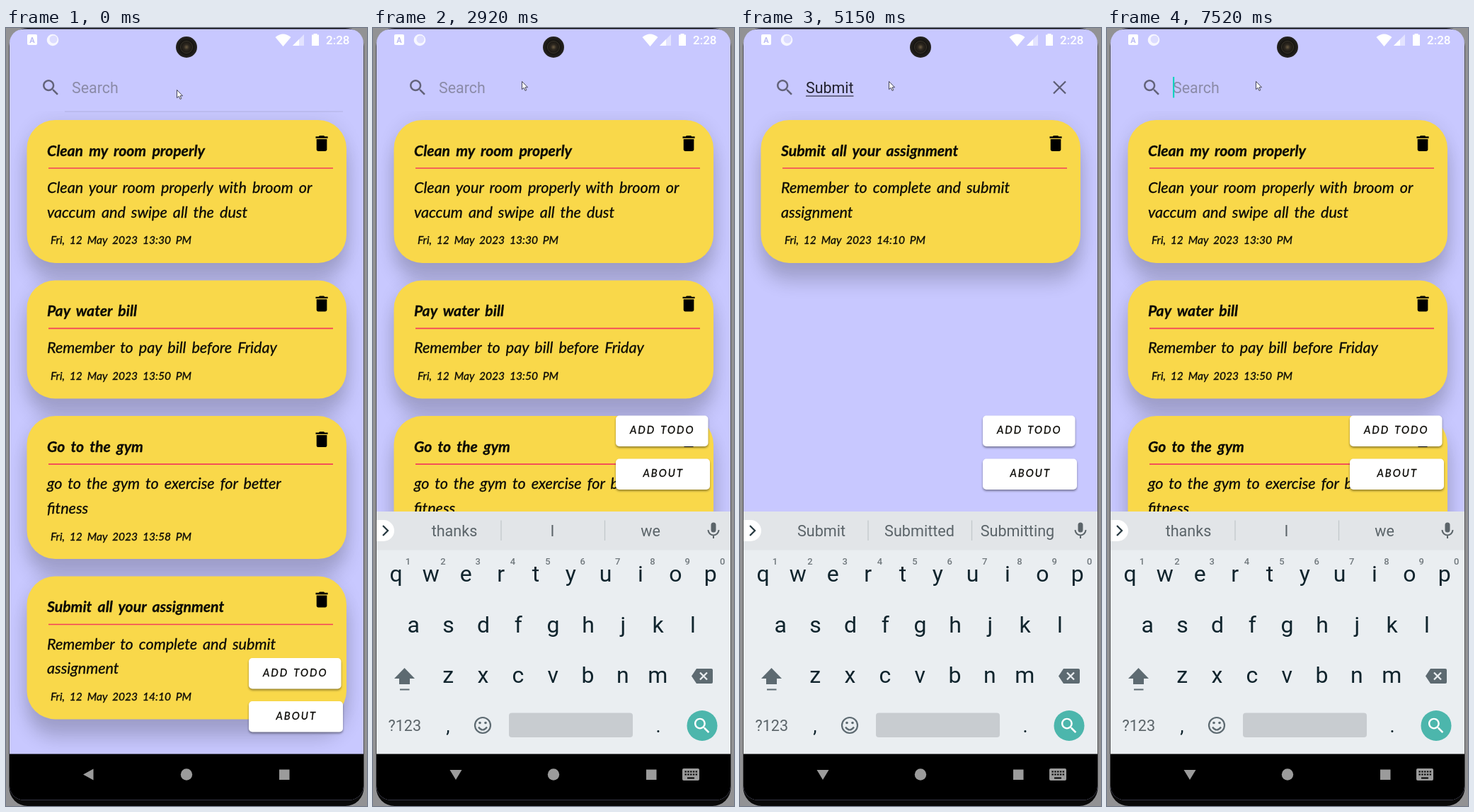
An HTML page that plays this animation: 510x1099 px, repeating every 8 s.

```html
<!DOCTYPE html>
<html lang="en">
<head>
<meta charset="utf-8">
<title>Todo search</title>
<style>
html, body { margin: 0; width: 100%; height: 100%; overflow: hidden; background: #000; }
svg { display: block; width: 100%; height: 100%; }
text { font-family: Roboto, sans-serif; white-space: pre; }
.hand { font-family: Lato, sans-serif; font-style: italic; fill: #0b0a06; stroke: #0b0a06; stroke-width: .3; }
.title { font-size: 21.2px; font-weight: 700; word-spacing: 3.6px; }
.body { font-size: 21.6px; word-spacing: 3px; }
.date { font-size: 15.6px; word-spacing: 3.2px; }
.btn { font-size: 14.8px; letter-spacing: 2px; word-spacing: 2px; }
.field { font-size: 21.4px; }
.key { font-size: 32px; fill: #10242d; }
.word { font-size: 21.6px; fill: #5b6469; }
.num { font-size: 13px; font-weight: 500; fill: #70787d; }
.mid { text-anchor: middle; }
</style>
</head>
<body>
<svg viewBox="0 0 510 1099" xmlns="http://www.w3.org/2000/svg">
  <defs>
    <radialGradient id="lens">
      <stop offset="0" stop-color="#6b5c42"/><stop offset=".25" stop-color="#2e2820"/>
      <stop offset=".6" stop-color="#15130f"/><stop offset="1" stop-color="#262422"/>
    </radialGradient>
    <filter id="soft" x="-20%" y="-40%" width="140%" height="180%"><feGaussianBlur stdDeviation="13"/></filter>
    <filter id="lift" x="-10%" y="-20%" width="120%" height="150%"><feGaussianBlur stdDeviation="1.6"/></filter>
    <clipPath id="screen"><rect x="5" y="1.5" width="500" height="1089" rx="20"/></clipPath>
    <clipPath id="list"><rect id="listBox" x="5" y="117" width="500" height="909"/></clipPath>
    <clipPath id="dock"><rect x="5" y="683" width="500" height="343"/></clipPath>
    <path id="glass" d="M15.5 14h-.79l-.28-.27C15.41 12.59 16 11.11 16 9.5 16 5.91 13.09 3 9.5 3S3 5.91 3 9.5 5.91 16 9.5 16c1.61 0 3.09-.59 4.23-1.57l.27.28v.79l5 4.99L20.49 19l-4.99-5zm-6 0C7.01 14 5 11.99 5 9.5S7.01 5 9.5 5 14 7.01 14 9.5 11.99 14 9.5 14z"/>
    <path id="bin" d="M6 19c0 1.1.9 2 2 2h8c1.1 0 2-.9 2-2V7H6v12zM19 4h-3.5l-1-1h-5l-1 1H5v2h14V4z"/>
  </defs>

  <rect width="510" height="1099" fill="#929294"/>
  <rect x="4.500" width="501" height="1099" rx="26" fill="#0a0a0a"/>

  <g clip-path="url(#screen)">
    <rect x="5" width="500" height="1099" fill="#c8c8ff"/>

    <g id="status" fill="#fff">
      <rect x="30" y="9" width="14" height="15" rx="2"/>
      <text x="37" y="21" class="mid" font-size="11" font-weight="700" fill="#b9b9f4">A</text>
      <circle cx="66" cy="17" r="8.3" opacity=".85"/>
      <circle cx="67" cy="16" r="5.5" fill="#dcdcff"/>
      <path d="M380.5 13Q391.500 4 402.500 13L391.500 26Z"/>
      <path d="M421 9V25H405Z" opacity=".5"/><path d="M414 16V25H405Z"/>
      <path d="M434.500 9.500V8H439.500V9.500H442V25H432V9.500Z"/>
      <text x="452" y="23" font-size="17" font-weight="500">2:28</text>
    </g>
    <circle cx="255" cy="27" r="15" fill="url(#lens)"/>
    <circle cx="255" cy="27" r="8.500" fill="none" stroke="#3a352c"/>

    <use href="#glass" transform="translate(48.3 69.2) scale(1.25)" fill="#63637a"/>
    <path id="rule" d="M83 118H476" stroke="#b4b4e4" stroke-width="1.2"/>
    <text id="query" class="field" x="93" y="92"></text>
    <path id="under" stroke="#33334a" stroke-width="1.3"/>
    <rect id="caret" y="69" width="2.2" height="29.500" fill="#0fd3c0"/>
    <path id="clear" d="M443 75.500L460 92.500M460 75.500L443 92.500" stroke="#5c5c74" stroke-width="2.2"/>

    <g id="cards" clip-path="url(#list)"></g>
    <g id="buttons"></g>
    <g clip-path="url(#dock)">
      <rect id="blank" x="5" y="683" width="500" height="343" fill="#fff"/>
      <g id="keys"></g>
    </g>

    <rect x="5" y="1025.500" width="500" height="74" fill="#000"/>
    <g fill="#9b9b9b">
      <path id="back"/>
      <circle cx="255" cy="1054.500" r="8.200"/>
      <rect x="386" y="1047.500" width="14.500" height="14.500"/>
      <g id="imeIcon">
        <rect x="437" y="1046" width="24" height="17" rx="2"/>
        <path d="M440.500 1050.500H458M440.500 1054.500H458" stroke="#000" stroke-width="2.2" stroke-dasharray="2.3 1.5"/>
        <path d="M444 1059.500H454" stroke="#000" stroke-width="2"/>
      </g>
    </g>
  </g>
  <path id="pointer" d="M0 0V11.200L2.700 8.900L4.500 13L6.300 12.200L4.500 8.300H8Z" fill="#fff" stroke="#333347" stroke-width=".9"/>
</svg>

<script>
const LOOP = 8000;
const $ = id => document.getElementById(id);
const show = (id, on) => $(id).setAttribute('visibility', on ? 'visible' : 'hidden');
const label = (cls, x, y, s) => `<text class="${cls}" x="${x}" y="${y}">${s}</text>`;
const last = (steps, t) => steps.filter(s => s[0] <= t).pop();

const todos = [
  ['Clean my room properly', ['Clean your room properly with broom or', 'vaccum and swipe all the dust'], '13:30'],
  ['Pay water bill', ['Remember to pay bill before Friday'], '13:50'],
  ['Go to the gym', ['go to the gym to exercise for better', 'fitness'], '13:58'],
  ['Submit all your assignment', ['Remember to complete and submit', 'assignment'], '14:10']
];

// Each step: start time, then its value
const pointerSteps = [
  [0, 241, 87], [140, 268, 101], [260, 288, 140], [380, 272, 135], [500, 246, 122],
  [650, 201, 118], [800, 198, 131], [950, 217, 115], [1090, 210, 75]
];
const typed = [
  [0, ''], [3480, 'S'], [3910, 'Su'], [4030, 'Sub'], [4280, 'Subm'], [4530, 'Submi'], [4650, 'Submit'],
  [5680, 'Submi'], [5830, 'Subm'], [5950, 'Sub'], [6070, 'Su'], [6340, 'S'], [6610, '']
];
const hints = [
  [0, 'thanks I we'], [3480, 'S So She'], [3910, 'Su Sure Sunday'], [4030, 'Sub Submit Subject'],
  [4280, 'Subm Submit Subject'], [4530, 'Submit Submitted Submitting'], [5830, 'Subm Submit Subject'],
  [5950, 'Sub Submit Subject'], [6220, 'Su Sure Sunday'], [6460, 'S So She'], [6610, 'thanks I we']
];
const caretSteps = [[0, 0], [2180, 1], [2920, 0], [3480, 1], [5150, 0], [5680, 1], [6990, 0], [7520, 1]];
const RESIZE = 2300, KEYS_IN = 2550, KEYS_SET = 2670;

function cardList(filter) {
  let y = 130, shadows = '', faces = '';
  for (const [title, lines, hour] of todos) {
    if (!(title + ' ' + lines.join(' ')).toLowerCase().includes(filter.toLowerCase())) continue;
    const h = 132.5 + lines.length * 34.7;
    const box = (dy, attrs) => `<rect x="29.5" y="${y + dy}" width="451.5" height="${h}" rx="40" ${attrs}/>`;
    shadows += box(27, 'fill="#000" opacity=".17" filter="url(#soft)"') +
               box(2, 'fill="#000" opacity=".09" filter="url(#soft)"');
    faces += box(0, 'fill="#f9d84a"') +
      label('hand title', 58, y + 50.5, title) +
      `<path d="M60 ${y + 68}H462" stroke="#f33f5a" stroke-width="1.6"/>` +
      `<use href="#bin" transform="translate(431.4 ${y + 18.4}) scale(1.22)"/>` +
      lines.map((s, i) => label('hand body', 58, y + 103 + i * 34.7, s)).join('') +
      label('hand date', 63, y + h - 26.5, `Fri, 12 May 2023 ${hour} PM`);
    y += h + 24.5;
  }
  return shadows + faces;
}

function button(y, w, x, s) {
  const box = `x="343" width="${w}" height="43.5" rx="5"`;
  return `<rect ${box} y="${y + 2}" fill="#000" opacity=".4" filter="url(#lift)"/>` +
    `<rect ${box} y="${y}" fill="#fff"/>` + label('hand btn', x, y + 25.5, s);
}

function keyboard() {
  const row = (keys, x, y, cls = 'key mid') =>
    [...keys].map((k, i) => label(cls, x + i * 49.35, y, k)).join('');
  return `<rect x="5" y="683" width="500" height="343" fill="#eaeef1"/>
    <rect x="5" y="683" width="500" height="54.5" fill="#e2e5e8"/>
    <path d="M181 695.5V724M327.500 695.5V724" stroke="#c3c8cc" stroke-width="1.3"/>
    <path d="M5 695H15A15 15 0 0 1 15 725H5Z" fill="#fff"/>
    <path d="M14 703L21 710L14 717" fill="none" stroke="#273940" stroke-width="2.3"/>
    <rect x="477.500" y="698.500" width="7" height="14" rx="3.500" fill="#5b6469"/>
    <path d="M473.500 709A7.500 7.500 0 0 0 488.500 709M481 716.500V721" fill="none" stroke="#5b6469" stroke-width="2"/>
    <g id="hints"></g>` +
    row('qwertyuiop', 32.5, 782) + row('1234567890', 49.5, 758, 'num mid') +
    row('asdfghjkl', 57.2, 853.5) + row('zxcvbnm', 106.2, 925) +
    `<path d="M44.500 904L59 919H52V927H37V919H30Z" fill="#5d6a71"/>
    <path d="M38 934.500H51.500" stroke="#5d6a71" stroke-width="2"/>
    <path d="M450 915.500L457 905H478Q480 905 480 907V924Q480 926 478 926H457Z" fill="#5d6a71"/>
    <path d="M462 910.500L472 920.500M472 910.500L462 920.500" stroke="#eaeef1" stroke-width="2.3"/>` +
    label('word', 21.5, 993, '?123') +
    `<text class="mid" x="106" y="995" font-size="27" fill="#10242d">,</text>
    <text class="mid" x="403" y="995" font-size="27" fill="#10242d">.</text>
    <g fill="none" stroke="#5d6a71" stroke-width="2.2">
      <circle cx="155" cy="985" r="11"/><path d="M149 987.500Q155 995.500 161 987.500"/>
    </g>
    <circle cx="151" cy="981.500" r="1.800" fill="#5d6a71"/><circle cx="159" cy="981.500" r="1.800" fill="#5d6a71"/>
    <rect x="192" y="967.500" width="175" height="34.500" rx="4" fill="#c8ccd0"/>
    <circle cx="465" cy="985.500" r="21.500" fill="#4cb6ac"/>
    <use href="#glass" transform="translate(450.300 971) scale(1.22)" fill="#fff"/>`;
}

$('keys').innerHTML = keyboard();
$('buttons').innerHTML = button(890, 130.5, 363, 'ADD TODO') + button(951, 133, 381.5, 'ABOUT');

let shownText = null, shownHints = null;

function setText(s) {
  if (s === shownText) return;
  shownText = s;
  const q = $('query');
  q.textContent = s || 'Search';
  q.setAttribute('fill', s ? '#22222f' : '#8b8ba8');
  const end = 93 + (s ? q.getComputedTextLength() : 0);
  $('under').setAttribute('d', s ? `M93 96.200H${end}` : '');
  $('caret').setAttribute('x', end + (s ? .3 : 0));
  show('clear', s);
  $('cards').innerHTML = cardList(s);
}

function setHints(s) {
  if (s === shownHints) return;
  shownHints = s;
  $('hints').innerHTML = s.split(' ').map((w, i) => label('word mid', 115 + i * 138.5, 718, w)).join('');
}

function draw(t) {
  const [, px, py] = last(pointerSteps, t);
  const open = t >= RESIZE;
  $('pointer').setAttribute('transform', `translate(${px + .5} ${py + .5})`);
  setText(last(typed, t)[1]);
  setHints(last(hints, t)[1]);
  show('caret', last(caretSteps, t)[1]);
  show('rule', t < 2180);
  $('listBox').setAttribute('height', open ? 566 : 909);
  $('buttons').setAttribute('transform', `translate(0 ${open ? -342.500 : 0})`);
  show('blank', open);
  show('keys', t >= KEYS_IN);
  $('keys').setAttribute('transform', `translate(0 ${t < KEYS_SET ? 60 : 0})`);
  show('imeIcon', open);
  $('back').setAttribute('d', open ? 'M108.500 1048H125.500L117 1062Z' : 'M109 1054.500L123.500 1046.500V1062.500Z');
}

function tick() {
  draw(performance.now() % LOOP);
  requestAnimationFrame(tick);
}
tick();
</script>
</body>
</html>
```
